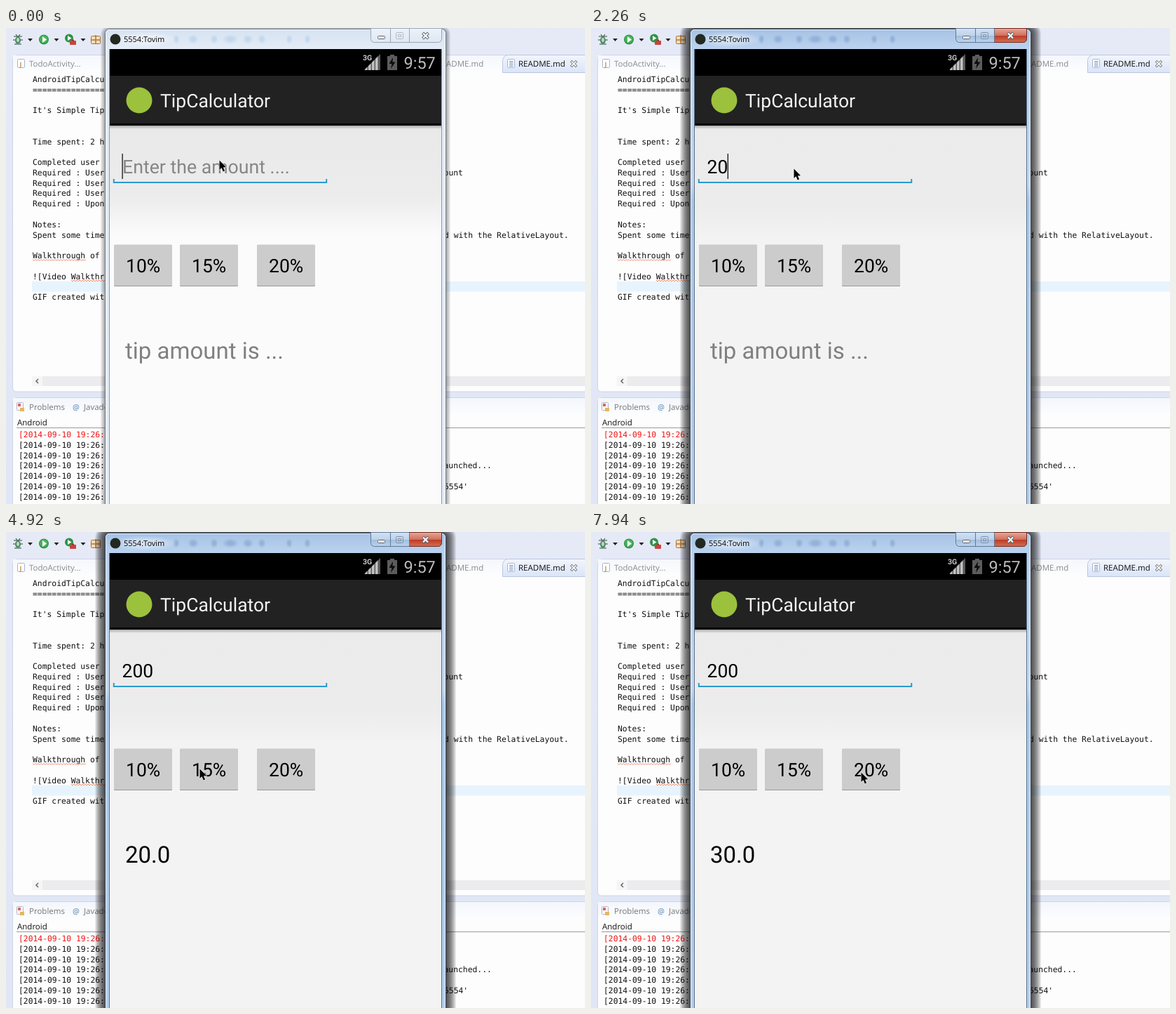
These frames come from a looping animation (826x678 px, 8000 ms). An HTML page with a canvas:

```html
<!DOCTYPE html>
<html lang="en">
<head>
<meta charset="utf-8">
<title>Tip calculator demo</title>
<style>
html, body { margin: 0; width: 100%; height: 100%; overflow: hidden; background: #e3e8f6; }
canvas { display: block; }
</style>
</head>
<body>
<canvas id="stage" width="826" height="678"></canvas>
<script>
const stage = document.getElementById('stage').getContext('2d');
let ctx = stage;
const LOOP = 8000;
const UI = '"Open Sans", "Noto Sans", sans-serif';
const MONO = '11.35px "DejaVu Sans Mono", monospace';
const APP = 'Roboto, sans-serif';

// Each row: start time, then the value(s) that hold from there on
const pointer = [
  [0, 304, 188], [850, 298, 189], [980, 293, 189], [1250, 290, 197], [1400, 289, 200],
  [3120, 258, 261], [3270, 236, 306], [3390, 217, 342], [3550, 206, 355],
  [4530, 236, 342], [4650, 263, 331], [4800, 276, 337],
  [7270, 304, 339], [7390, 339, 341], [7700, 400, 341], [7820, 391, 342], [7940, 385, 342]
];
const typed = [[0, ''], [1830, '2'], [2260, '20'], [2380, '200']];
const result = [[0, ''], [3980, '20.0'], [5500, '30.0']];
const pressed = [[0, -1], [3850, 0], [3980, -1], [5350, 1], [5500, -1]];
const caretFlips = [300, 850, 1400, 1830, 2810, 3270, 3850, 4380, 4920, 5350, 5780, 6310, 6870, 7390, 7940];
const ACTIVE_AT = 980;

const at = (track, t) => track.filter(k => k[0] <= t).pop();

function rect(x, y, w, h, fill) {
  ctx.fillStyle = fill;
  ctx.fillRect(x, y, w, h);
}
function round(x, y, w, h, r, fill, stroke) {
  ctx.beginPath();
  ctx.roundRect(x, y, w, h, r);
  if (fill) { ctx.fillStyle = fill; ctx.fill(); }
  if (stroke) { ctx.strokeStyle = stroke; ctx.lineWidth = 1; ctx.stroke(); }
}
function disc(x, y, r, fill, ry = r) {
  ctx.beginPath();
  ctx.ellipse(x, y, r, ry, 0, 0, 2 * Math.PI);
  ctx.fillStyle = fill;
  ctx.fill();
}
function trace(points) {
  ctx.beginPath();
  for (let i = 0; i < points.length; i += 2) ctx.lineTo(points[i], points[i + 1]);
}
function poly(points, fill) {
  trace(points);
  ctx.closePath();
  ctx.fillStyle = fill;
  ctx.fill();
}
function line(points, stroke, width = 1) {
  trace(points);
  ctx.strokeStyle = stroke;
  ctx.lineWidth = width;
  ctx.stroke();
}
function text(str, x, y, font, fill) {
  ctx.font = font;
  ctx.fillStyle = fill;
  ctx.fillText(str, x, y);
}
function fade(y0, y1, ...stops) {
  const g = ctx.createLinearGradient(0, y0, 0, y1);
  for (const [p, c] of stops) g.addColorStop(p, c);
  return g;
}
function glow(x, y, rx, ry, rgb, alpha) {
  ctx.save();
  ctx.translate(x, y);
  ctx.scale(rx, ry);
  const g = ctx.createRadialGradient(0, 0, 0.3, 0, 0, 1);
  g.addColorStop(0, `rgba(${rgb},${alpha})`);
  g.addColorStop(1, `rgba(${rgb},0)`);
  disc(0, 0, 1, g);
  ctx.restore();
}
function squiggle(x0, x1, y) {
  const pts = [];
  for (let x = x0, i = 0; x <= x1; x += 2, i++) pts.push(x, y + (i % 2 ? 1 : -1));
  line(pts, '#f07a5a', 0.9);
}

function toolbar() {
  for (const [a, b] of [[11, 12], [10, 17], [12, 23]]) line([a, b, 34 - a, b], '#3f5a4c', 1.1);
  line([14, 9, 17, 13, 20, 9], '#3f5a4c', 1.1);
  disc(17, 17.5, 4, '#4f8a72', 5.2);
  disc(17, 17, 1.8, '#c5e2ae', 3);
  for (const x of [34.5, 72, 110]) poly([x - 3.5, 15, x + 3.5, 15, x, 19], '#222');
  disc(54, 16.5, 7, '#2d9447');
  disc(54, 16, 5.6, '#4cb35e');
  poly([52, 12, 58, 16.5, 52, 21], '#fff');
  disc(90, 14.5, 6, '#2d9447');
  poly([88, 11, 93.5, 14.5, 88, 18], '#fff');
  round(91, 18, 9, 6, 1, '#c8443c');
  rect(94, 16.5, 3, 2, '#a2302c');
  round(121.5, 11.5, 13, 11, 1, '#f3dcb6', '#a9713b');
  line([128, 10, 128, 23], '#a9713b', 1.4);
  line([121, 17, 135, 17], '#a9713b', 1.4);
}

function pageIcon(x, y, ink, letter) {
  round(x + 0.5, y + 0.5, 10, 12, 1, '#fff', '#a9b3cc');
  if (letter) return text(letter, x + 3.5, y + 10.5, 'bold 9px ' + UI, ink);
  for (let i = 0; i < 4; i++) line([x + 3, y + 3.5 + i * 2.3, x + 8.5, y + 3.5 + i * 2.3], ink);
}

function editor() {
  const tab = '11.5px ' + UI;
  round(9.5, 38.5, 830, 479.5, [7, 0, 0, 5], '#fdfdfe', '#cdd4e8');
  rect(10, 39, 816, 23, fade(39, 62, [0, '#f5f7fc'], [1, '#fcfdfe']));
  pageIcon(16, 44, '#c0954a', 'J');
  text('TodoActivity...', 33, 55, tab, '#8a8a8a');
  text('ADME.md', 628, 55, tab, '#8a8a8a');
  round(708.5, 38.5, 125, 25, [8, 0, 0, 0], fade(38, 63, [0, '#f2f5fc'], [1, '#dbe5f8']), '#bac6e2');
  pageIcon(715, 44, '#6f8bb8');
  text('README.md', 731, 55, tab, '#111');
  for (const [s, c, w] of [[4, '#777', 3.4], [3.4, '#fff', 1.6]]) {
    line([810 - s, 51 - s, 810 + s, 51 + s], c, w);
    line([810 - s, 51 + s, 810 + s, 51 - s], c, w);
  }

  rect(37, 361, 789, 14.5, '#e8f4fd');
  const rows = {
    0: 'AndroidTipCalculator', 1: '================', 3: "It's Simple Tip", 6: 'Time spent: 2 h',
    8: 'Completed user', 9: 'Required : User', 10: 'Required : User', 11: 'Required : User',
    12: 'Required : Upon', 14: 'Notes:', 15: 'Spent some time', 17: 'Walkthrough of',
    19: '![Video Walkthrough]', 21: 'GIF created with'
  };
  const rowY = i => 77 + i * 14.77;
  for (const i in rows) text(rows[i], 38, rowY(i), MONO, '#111');
  text('ount', 624.6, rowY(9), MONO, '#111');
  text('d with the RelativeLayout.', 625, rowY(15), MONO, '#111');
  squiggle(38, 114, 330.5);
  squiggle(93, 141, 360);

  rect(37, 496, 789, 14, '#ececee');
  rect(37, 496, 15, 14, '#f5f5f6');
  line([46, 500, 43, 503, 46, 506], '#666', 1.5);
}

function consolePane() {
  round(9.5, 526.5, 830, 170, [7, 0, 0, 0], '#fdfdfe', '#cdd4e8');
  rect(10, 527, 816, 24, fade(527, 551, [0, '#f3f6fc'], [1, '#fcfdfe']));
  round(15.5, 533.5, 9, 11, 1, '#fff', '#b9b0c0');
  rect(17, 535, 4, 4, '#d9655f');
  rect(20, 541, 6, 5, '#e3b860');
  text('Problems', 33, 544, '11.5px ' + UI, '#777');
  text('@', 95, 544, '11px ' + UI, '#4d7fae');
  text('Javadoc', 111, 544, '11.5px ' + UI, '#777');
  text('Android', 16, 566, '11.5px ' + UI, '#111');
  line([15, 569.5, 826, 569.5], '#9b9b9b');
  for (let i = 0; i < 7; i++) {
    text('[2014-09-10 19:26:', 18, 583 + i * 14.77, MONO, i ? '#111' : '#f01414');
  }
  text('aunched...', 624.5, 583 + 3 * 14.77, MONO, '#111');
  text("5554'", 625, 583 + 5 * 14.77, MONO, '#111');
}

function windowFrame(active) {
  // Soft shadow from stacked translucent outlines
  const reach = active ? 14 : 6;
  for (let d = reach; d > 0; d--) {
    round(141 - d, 3 - d, 487 + 2 * d, 760, 6 + d, `rgba(0,0,0,${active ? 0.075 : 0.06})`);
  }
  const glass = active
    ? fade(0, 678, [0, '#a5c1e4'], [0.04, '#b9d1ee'], [0.33, '#c3d8f0'], [0.36, '#a9c8ea'], [1, '#b4cfed'])
    : fade(0, 678, [0, '#d6e2f1'], [0.04, '#e2ebf6'], [1, '#e3ecf7']);
  round(141.5, 1.5, 486, 720, 6, glass, active ? '#37424f' : '#6d7681');
  round(142.5, 2.5, 484, 718, 5, null, 'rgba(255,255,255,.7)');

  for (const [x, r] of [[243, 5], [267, 8], [297, 6], [320, 12], [345, 8], [365, 6], [404, 5], [430, 5]]) {
    glow(x, 16, r, 7, active ? '90,130,185' : '150,185,225', 0.35);
  }
  glow(198, 16, 46, 11, '255,255,255', 0.5);

  disc(156, 16, 7.5, '#23291f');
  text('5554:Tovim', 168, 20, '11px ' + UI, '#000');
  captionButtons(active);
  const edge = active ? '#5b6f88' : '#8e99a6';
  line([147.5, 678, 147.5, 30], edge);
  line([621.5, 30, 621.5, 678], edge);
}

function captionButtons(active) {
  const edge = active ? '#5f7896' : '#9aa6b5';
  const plain = active
    ? fade(1, 21, [0, '#d3e1f2'], [0.48, '#bfd3ea'], [0.5, '#a2bddd'], [1, '#bcd5ee'])
    : fade(1, 21, [0, '#edf2f9'], [1, '#dde7f3']);
  const red = fade(1, 21, [0, '#e6a596'], [0.48, '#d2705c'], [0.5, '#bd3a24'], [1, '#d8714f']);
  round(520.5, 0.5, 101, 20, [0, 0, 5, 5], plain, edge);
  if (active) round(575.5, 0.5, 46, 20, [0, 0, 5, 0], red, '#6e2b24');
  line([548.5, 1, 548.5, 20], edge);
  line([575.5, 1, 575.5, 20], edge);
  const ink = '#59636f';
  round(530.5, 11.5, 10, 4, 1, '#fff', ink);
  const dim = active ? '#8094ab' : '#b0bac5';
  round(556.5, 6.5, 10, 9, 1, null, dim);
  round(559.5, 9.5, 4, 3, 0, null, dim);
  for (const [s, c, w] of [[4, ink, 4], [3.5, '#fff', 2.2]]) {
    line([598.5 - s, 11 - s, 598.5 + s, 11 + s], c, w);
    line([598.5 - s, 11 + s, 598.5 + s, 11 - s], c, w);
  }
}

function phoneBars() {
  rect(148, 30, 473, 38, '#000');
  poly([511, 60, 534, 60, 534, 37], '#5a5a5a');
  for (let x = 512; x < 530; x += 5) {
    poly([x, 60, x + 3.5, 60, x + 3.5, 567.5 - x, x, 571 - x], '#c2c2c2');
  }
  rect(509, 37, 14.5, 10, '#000');
  text('3G', 509, 46, 'bold 10.5px ' + APP, '#c9c9c9');
  rect(548, 38, 6, 3, '#5c5c5c');
  rect(544, 40, 14, 20, '#5c5c5c');
  poly([552, 42, 546.5, 51, 550.5, 51, 549, 58, 555.5, 48.5, 551.5, 48.5], '#0c0c0c');
  text('9:57', 567.5, 58, '23.5px ' + APP, '#bdbdbd');

  rect(148, 68, 473, 68, '#222');
  rect(148, 136, 473, 3, '#000');
  disc(190, 103, 18.5, '#9cc13c');
  text('TipCalculator', 220, 113, '26.5px ' + APP, '#f3f3f3');
}

function screenBase(active) {
  rect(148, 139, 473, 539, active
    ? fade(139, 300, [0, '#ebebeb'], [0.7, '#ececec'], [0.84, '#efefef'], [1, '#f3f3f3'])
    : fade(139, 295, [0, '#e9e9e9'], [0.65, '#ececec'], [1, '#fbfbfb']));
  rect(148, 139, 473, 5, fade(139, 144, [0, 'rgba(0,0,0,.28)'], [1, 'rgba(0,0,0,0)']));
  phoneBars();
  line([153.8, 215, 153.8, 220, 457.2, 220, 457.2, 215], '#2a9bcf', 2);
}

function form(t) {
  const amount = at(typed, t)[1];
  const body = '26.5px ' + APP;
  if (amount) text(amount, 165.5, 207, body, '#000');
  else text('Enter the amount ....', 166, 207, '26.7px ' + APP, '#868686');
  if (caretFlips.filter(f => f <= t).length % 2 === 0) {
    rect(165.5 + 14.6 * amount.length, 179, 1.2, 36, '#000');
  }

  const down = at(pressed, t)[1];
  [[154, '10%'], [248, '15%'], [358, '20%']].forEach(([x, label], i) => {
    round(x, 309, 83, 59, 1.5, '#989898');
    round(x, 308.5, 83, 58.5, 1.5, i === down ? '#b7b7b7' : '#cccccc');
    text(label, x + 17, 348, body, '#000');
  });

  const tip = at(result, t)[1];
  text(tip || 'tip amount is ...', 170, 470.5, '33px ' + APP, tip ? '#000' : '#808080');
}

function mouse(t) {
  const [, x, y] = at(pointer, t);
  const arrow = [0, 0, 0, 13.5, 3, 10.8, 5.2, 16, 7.6, 15, 5.4, 10, 9.6, 9.8, 0, 0];
  ctx.save();
  ctx.translate(x + 0.5, y + 0.5);
  ctx.lineJoin = 'round';
  line(arrow, 'rgba(255,255,255,.75)', 1.4);
  poly(arrow, '#000');
  ctx.restore();
}

// The desktop is painted once per window state
function backdrop(active) {
  const layer = document.createElement('canvas');
  layer.width = 826;
  layer.height = 678;
  ctx = layer.getContext('2d');
  ctx.textRendering = 'geometricPrecision';
  rect(0, 0, 826, 678, fade(0, 678, [0, '#e6eaf7'], [1, '#e0e6f5']));
  toolbar();
  editor();
  consolePane();
  windowFrame(active);
  screenBase(active);
  ctx = stage;
  return layer;
}

const idle = backdrop(false), focused = backdrop(true);
const times = [pointer, typed, result, pressed].flat().map(k => k[0]).concat(caretFlips);
stage.textRendering = 'geometricPrecision';
let shown = -1;

function draw(t) {
  const step = Math.max(...times.filter(k => k <= t));
  if (step === shown) return;
  shown = step;
  ctx.drawImage(t >= ACTIVE_AT ? focused : idle, 0, 0);
  form(t);
  mouse(t);
}

const start = performance.now();
function tick() {
  draw(Math.max(0, performance.now() - start) % LOOP);
  requestAnimationFrame(tick);
}
tick();
</script>
</body>
</html>
```
